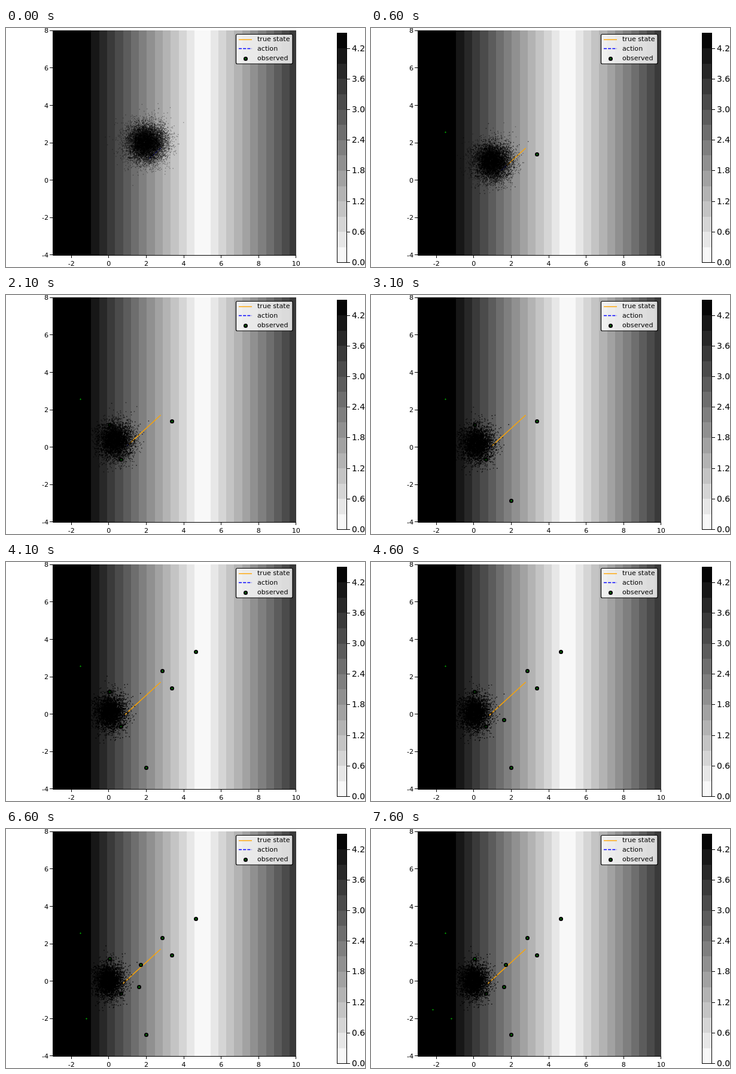
Recreate the animation shown at these times as an HTML page with a canvas. Size 600 by 400 pixels, loop 8 s.

```html
<!DOCTYPE html>
<html>
<head>
<meta charset="utf-8">
<style>
  html, body { margin: 0; width: 100%; height: 100%; overflow: hidden; background: #fff; }
  canvas { display: block; }
</style>
</head>
<body>
<canvas id="stage" width="600" height="400"></canvas>
<script>
const ctx = document.getElementById('stage').getContext('2d');
const UNIT = 31.3, LOOP = 8000, COUNT = 10000;
const px = x => 171.87 + x * UNIT;
const py = y => 254.7 - y * UNIT;

// every step removes the same share of the remaining distance
const decay = step => Math.SQRT1_2 ** step;
const trueState = step => [194 + 64.5 * decay(step), 260 - 59 * decay(step)];

// readings that fall inside the plot: step, x, y
const observations = [[1, 277, 211], [2, 124, 174], [3, 192, 275], [4, 173, 217], [6, 234, 344],
  [8, 317, 150], [9, 261, 182], [10, 222, 264], [13, 134, 317], [14, 225, 227], [16, 103, 302]];

let seed = 7;
const random = () => (seed = (seed * 16807) % 2147483647) / 2147483647;
const particles = Array.from({ length: COUNT }, () => {
  const r = Math.sqrt(-2 * Math.log(random())), a = random() * 2 * Math.PI;
  return [r * Math.cos(a), r * Math.sin(a)];
});

function shade(k) {
  const v = Math.round(248 - 17.3 * k);
  return `rgb(${v},${v},${v})`;
}

function line(points, color = '#000', width = 1, dash = []) {
  ctx.strokeStyle = color;
  ctx.lineWidth = width;
  ctx.setLineDash(dash);
  ctx.beginPath();
  points.forEach(p => ctx.lineTo(...p));
  ctx.stroke();
  ctx.setLineDash([]);
}

function text(s, x, y, align, size = 11.11) {
  ctx.font = `${size}px "DejaVu Sans", sans-serif`;
  ctx.textAlign = align;
  ctx.fillStyle = '#000';
  ctx.fillText(s, x, y);
}

function marker(x, y) {
  ctx.fillStyle = '#000';
  ctx.beginPath();
  ctx.arc(x + .5, y + .5, 3.5, 0, 2 * Math.PI);
  ctx.fill();
  ctx.fillStyle = '#008000';
  ctx.fillRect(x - 1, y, 3, 1);
  ctx.fillRect(x, y - 1, 1, 3);
}

function drawContours() {
  const band = .3 * Math.SQRT2 * UNIT, mid = px(5);
  ctx.fillStyle = '#000';
  ctx.fillRect(78, 4, 407, 376);
  for (let k = 13; k >= 0; k--) {
    const left = Math.round(mid - (k + 1) * band);
    const right = Math.min(485, Math.round(mid + (k + 1) * band));
    ctx.fillStyle = shade(k);
    ctx.fillRect(left, 4, right - left, 376);
  }
}

function drawAxes() {
  line([[78.5, 4], [78.5, 380.5], [485, 380.5]]);
  for (let v = -2; v <= 10; v += 2) {
    const x = Math.floor(px(v)) + .5;
    line([[x, 380], [x, 385]]);
    text(v, px(v), 398, 'center');
  }
  for (let v = -4; v <= 8; v += 2) {
    const y = Math.floor(py(v)) + .5;
    line([[73, y], [78, y]]);
    text(v, 71, Math.round(py(v)) + 4, 'right');
  }
}

function drawColorbar() {
  const level = v => 392.5 - v * 256 / 3;
  for (let k = 14; k >= 0; k--) {
    const top = Math.round(level((k + 1) * .3));
    ctx.fillStyle = shade(k);
    ctx.fillRect(553, top, 16, Math.round(level(k * .3)) - top);
  }
  ctx.strokeStyle = '#000';
  ctx.lineWidth = 1;
  ctx.strokeRect(553.5, 8.5, 16, 384);
  for (let i = 0; i < 8; i++) {
    const y = Math.floor(level(i * .6));
    line([[569, y + .5], [575, y + .5]]);
    text((i * .6).toFixed(1), 578, y + 5, 'left', 13.89);
  }
}

function drawLegend() {
  ctx.fillStyle = 'rgba(255,255,255,.8)';
  ctx.strokeStyle = '#000';
  ctx.lineWidth = 1.2;
  ctx.beginPath();
  ctx.roundRect(384.5, 10.5, 94.5, 49.5, 2);
  ctx.fill();
  ctx.stroke();
  line([[389, 19.5], [411, 19.5]], '#ffa500', 1.4);
  line([[389, 34.5], [411, 34.5]], '#00f', 1.4, [5, 2.2]);
  marker(400, 51);
  ['true state', 'action', 'observed'].forEach((s, i) => text(s, 420, 22 + i * 16, 'left'));
}

function drawCloud(step) {
  const mean = 2 * decay(step);
  const sx = Math.max(12, 16 - .35 * step), sy = 16 - .1 * step;
  // resampling leaves ever fewer distinct particles
  const pool = Math.max(3000, Math.round(COUNT * .85 ** step));
  ctx.fillStyle = 'rgba(0,0,0,.35)';
  for (let i = 0; i < COUNT; i++) {
    const [u, v] = particles[i % pool];
    ctx.fillRect(px(mean) + u * sx - .7, py(mean) + v * sy - .7, 1.4, 1.4);
  }
}

function draw(step) {
  ctx.fillStyle = '#fff';
  ctx.fillRect(0, 0, 600, 400);
  drawContours();
  const trail = Array.from({ length: step + 1 }, (_, i) => trueState(i));
  line(trail, '#ffa500', 1.4);
  line([trueState(step), trueState(step + 1)], '#00f', 1.2, [5, 2.2]);
  observations.forEach(([start, x, y]) => start <= step && marker(x, y));
  drawCloud(step);
  drawAxes();
  drawColorbar();
  drawLegend();
}

let shown = -1;
function tick() {
  const t = performance.now() % LOOP;
  const step = Math.floor((t + 400) / 500);
  if (step !== shown) draw(shown = step);
  requestAnimationFrame(tick);
}
tick();
</script>
</body>
</html>
```
